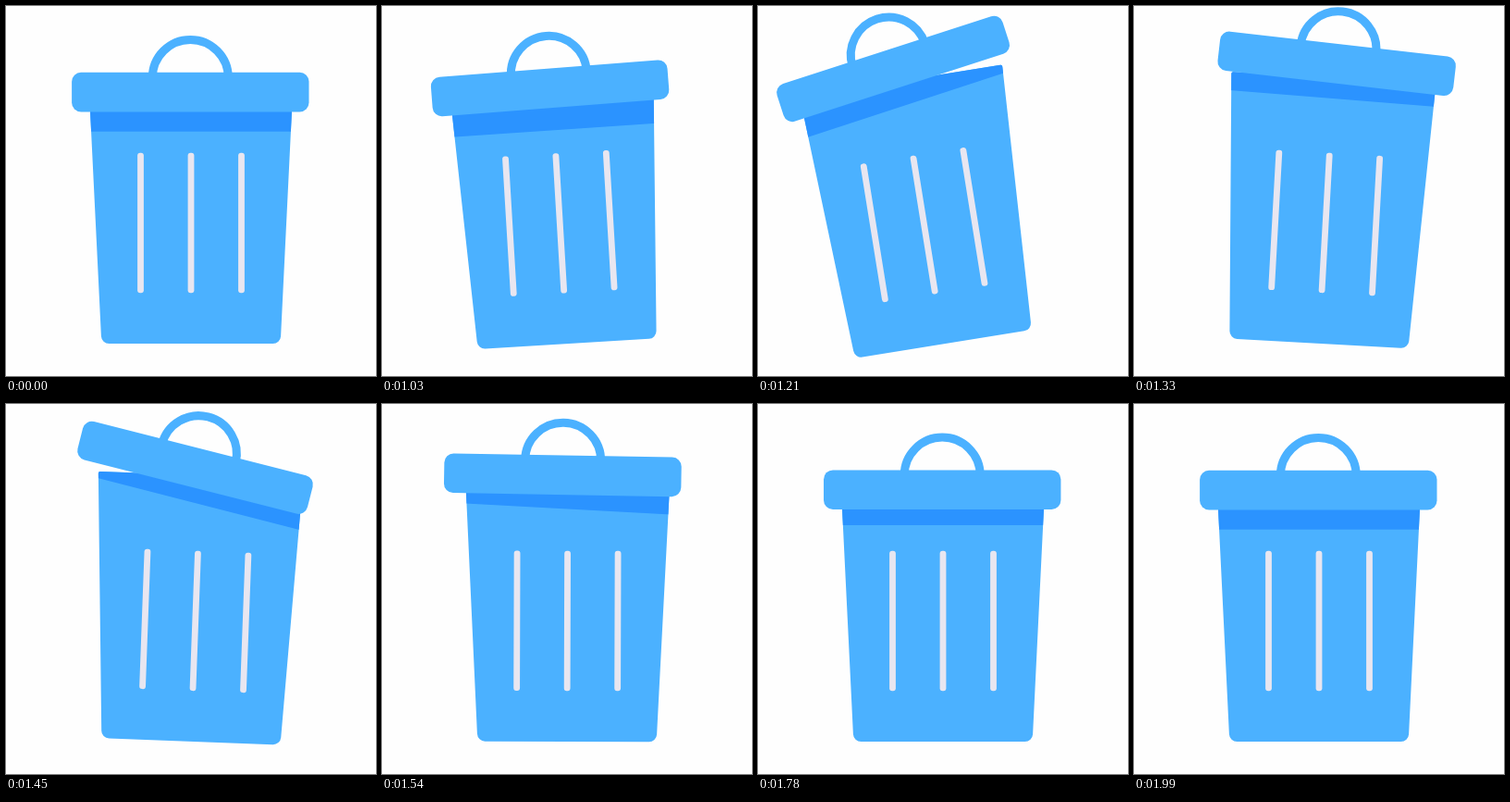
Animation, 400 px wide and 400 px high, one loop 2.02 s. Source, as an HTML page with a canvas:

```html
<!DOCTYPE html>
<html lang="en">
<head>
<meta charset="utf-8">
<title>Rattling bin</title>
<style>
  html, body { margin: 0; height: 100%; overflow: hidden; background: #fefefe; }
  canvas { display: block; }
</style>
</head>
<body>
<canvas id="stage" width="400" height="400"></canvas>
<script>
const ctx = document.getElementById('stage').getContext('2d');
const LIGHT = '#4bb1ff', DARK = '#2b93ff', BAR = '#e8e6f0';
const LOOP = 2020, START = 1030, STEP = 30;
const SHADOW_LAG = 14;

// Swings between turning points [ms, value] with sine easing
const swing = (...points) => t => {
  const i = points.findIndex(p => p[0] > t);
  if (i < 0) return points[points.length - 1][1];
  if (i === 0) return points[0][1];
  const [t0, a] = points[i - 1], [t1, b] = points[i];
  return a + (b - a) * (1 - Math.cos(Math.PI * (t - t0) / (t1 - t0))) / 2;
};

const bodyTilt = swing([920, 0], [1190, -9.65], [1350, 3.7], [1570, 0]);
const lidTilt = swing([985, 0], [1195, -9], [1440, 12.3], [1590, -3], [1730, 0]);
const lidSlide = swing([950, 0], [1210, -5.6], [1330, 3.1], [1450, -5.6], [1810, 0]);
const lidLift = swing([950, 0], [1260, 32.5], [1820, 0]);
const shadowDepth = swing([START, 45.7], [1400, 37.3], [1630, 35.9], [1990, 42.7]);

function placed(x, y, degrees, draw) {
  ctx.save();
  ctx.translate(x, y);
  ctx.rotate(degrees * Math.PI / 180);
  draw();
  ctx.restore();
}

function roundRect(x, y, w, h, r, color) {
  ctx.fillStyle = color;
  ctx.beginPath();
  ctx.roundRect(x, y, w, h, r);
  ctx.fill();
}

function bodyPath() {
  const path = new Path2D();
  path.moveTo(200, 77);
  path.arcTo(310.8, 77, 296.7, 365, 2);
  path.arcTo(296.7, 365, 200, 365, 8.5);
  path.arcTo(103.3, 365, 89.2, 77, 8.5);
  path.arcTo(89.2, 77, 200, 77, 2);
  path.closePath();
  return path;
}
const BODY = bodyPath();

function drawBody(t, x, y) {
  ctx.save();
  ctx.fillStyle = LIGHT;
  ctx.fill(BODY);
  ctx.clip(BODY);
  placed(x, y, lidTilt(t - SHADOW_LAG), () => {
    ctx.fillStyle = DARK;
    ctx.fillRect(-300, shadowDepth(t) - 400, 600, 400);
  });
  ctx.restore();
  for (const side of [-1, 0, 1]) roundRect(196.6 + side * 54.5, 158.7, 6.8, 151.5, 3, BAR);
}

function drawLid() {
  ctx.strokeStyle = LIGHT;
  ctx.lineWidth = 9;
  ctx.beginPath();
  ctx.arc(0, -15.5, 41, Math.PI, 0);
  ctx.stroke();
  roundRect(-128.2, -21.2, 256.4, 42.6, 10, LIGHT);
}

function render(t) {
  const x = 199.3 + lidSlide(t), y = 93 - lidLift(t);
  ctx.fillStyle = '#fefefe';
  ctx.fillRect(0, 0, 400, 400);
  placed(203, 363, bodyTilt(t), () => {
    ctx.translate(-203, -363);
    drawBody(t, x, y);
    placed(x, y, lidTilt(t), drawLid);
  });
}

// At rest until START, then moving in steps
function frame(now) {
  const t = now % LOOP;
  render(t < START ? LOOP : t - (t - START) % STEP);
  requestAnimationFrame(frame);
}
frame(0);
</script>
</body>
</html>
```
